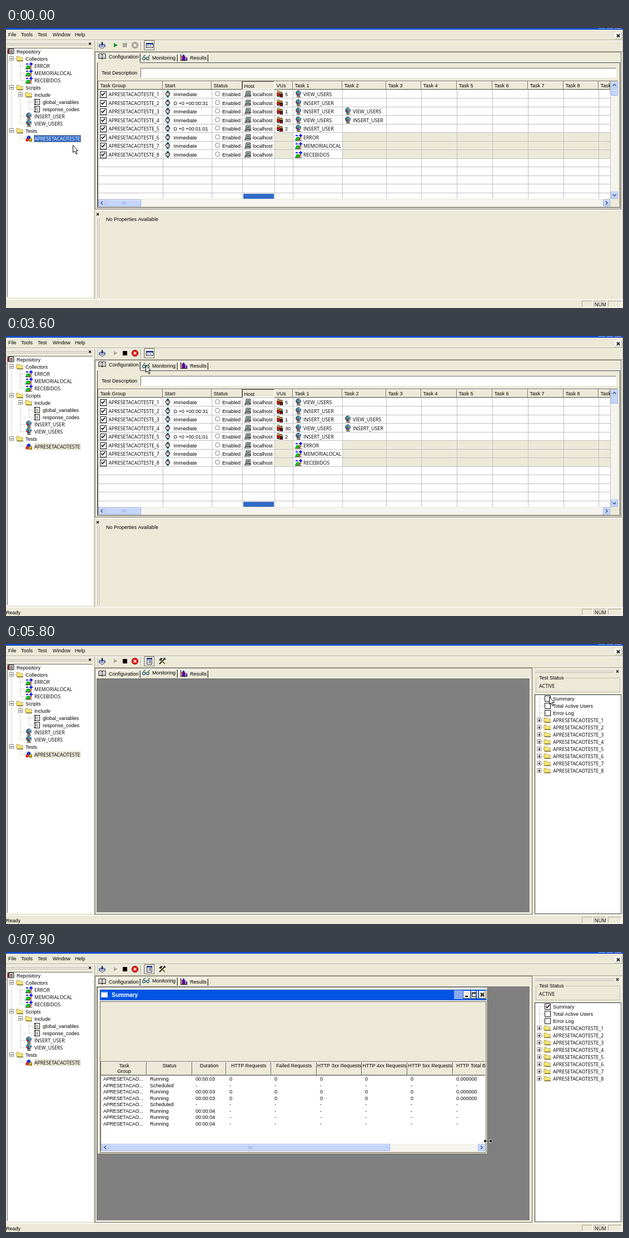
An HTML page with a canvas for the animation above (8 s loop, 1110 by 505 pixels).

```html
<!DOCTYPE html>
<html lang="en">
<head>
<meta charset="utf-8">
<title>Test runner</title>
<style>
html, body { margin: 0; width: 100%; height: 100%; overflow: hidden; background: #ece9d8; }
canvas { display: block; }
</style>
</head>
<body>
<canvas id="stage" width="1110" height="505"></canvas>
<script>
const ctx = document.getElementById('stage').getContext('2d');
const FACE = '#ece9d8', SHADE = '#aca899', DARK = '#716f64', BLUE = '#316ac5', LOOP = 8000;
const TASK = 'APRESETACAOTESTE';
const SANS = '"Liberation Sans", Arial, sans-serif';

// ---------- primitives ----------
function rect(c, x, y, w, h) { ctx.fillStyle = c; ctx.fillRect(x, y, w, h); }
function frame(c, x, y, w, h) {
  ctx.strokeStyle = c; ctx.lineWidth = 1;
  ctx.strokeRect(x + .5, y + .5, w - 1, h - 1);
}
function bevel(x, y, w, h, tl, br) {
  rect(tl, x, y, w, 1); rect(tl, x, y, 1, h);
  rect(br, x, y + h - 1, w, 1); rect(br, x + w - 1, y, 1, h);
}
function poly(pts, fill, stroke, lw = 1) {
  ctx.beginPath();
  for (let i = 0; i < pts.length; i += 2) ctx.lineTo(pts[i], pts[i + 1]);
  if (fill) { ctx.closePath(); ctx.fillStyle = fill; ctx.fill(); }
  if (stroke) { ctx.strokeStyle = stroke; ctx.lineWidth = lw; ctx.stroke(); }
}
function disc(x, y, r, fill, stroke, lw = 1) {
  ctx.beginPath(); ctx.arc(x, y, r, 0, 7);
  if (fill) { ctx.fillStyle = fill; ctx.fill(); }
  if (stroke) { ctx.strokeStyle = stroke; ctx.lineWidth = lw; ctx.stroke(); }
}
function text(s, x, y, color = '#000', align = 'left', font) {
  const caps = /[A-Z]{3}/.test(s) && !/[a-z]/.test(s);
  ctx.font = font || (caps ? '8.8px "Open Sans", "Noto Sans", sans-serif' : '9px ' + SANS);
  ctx.fillStyle = color; ctx.textAlign = align;
  ctx.fillText(s, x, y);
}
function at(x, y, draw) { ctx.save(); ctx.translate(x, y); draw(); ctx.restore(); }
function clip(x, y, w, h, draw) {
  ctx.save(); ctx.beginPath(); ctx.rect(x, y, w, h); ctx.clip(); draw(); ctx.restore();
}
function cross(x, y, r, c, lw = 1.5) {
  poly([x - r, y - r, x + r, y + r], null, c, lw);
  poly([x + r, y - r, x - r, y + r], null, c, lw);
}

// ---------- icons, centred on the origin ----------
const icons = {
  folder() {
    poly([-6, 4, -6, -4, -2, -4, -1, -2, 5, -2, 5, 4], '#f2e06a', '#a89838', .8);
    rect('#fff6b0', -5, -1, 9, 1); rect('#4d4620', -5, 4, 11, 1);
  },
  repo() {
    rect('#222', -5, -5, 10, 10); rect('#ddd', -3, -4, 7, 8);
    rect('#333', -2, -2, 5, 1); rect('#333', -2, 0, 5, 1); rect('#333', -2, 2, 5, 1);
    rect('#b02030', -6, -3, 2, 7); rect('#777', 4, -4, 2, 9);
  },
  collector() {
    poly([-6, 6, -3, 0, 2, 0, 3, 6], '#00c820', '#067a18', .7);
    poly([-5, 5.5, 6, 5.5], null, '#703030', 1);
    poly([1, 3, 5, 0, 6, 1, 2, 5], '#e02818');
    rect('#1010f0', -5, -4, 4, 2);
    rect('#1010f0', 1, -4, 6, 2); rect('#1010f0', 3, -6, 2, 6);
  },
  globe() {
    disc(0, -1.5, 4.4, '#2458d8', '#142050', .8);
    poly([-3, -4, 0, -5, 1, -2, -2, 0], '#38b838');
    poly([1, -1, 4, -2, 2, 2], '#e8c830');
    rect('#d82020', -4, -1, 3, 2); rect('#bfe0ff', 1, -5, 2, 2);
    rect('#222', -3, 3, 6, 1); rect('#c8a020', -1, 3, 3, 2); rect('#222', -3, 5, 7, 1);
  },
  file() {
    rect('#111', -5, -5, 10, 11); rect('#fff', -3, -4, 7, 9);
    rect('#8a8a40', -1, -2, 3, 1); rect('#555', -2, 0, 3, 1); rect('#555', -1, 2, 3, 1);
    rect('#aaa', -5, -3, 1, 7);
  },
  test() {
    poly([-4, -2, 0, -5, 3, -3, 3, 1, -2, 2], '#2038d8', '#101870', .6);
    disc(-3, 3, 2.7, '#e02020');
    rect('#e8d020', 0, 0, 6, 6); frame('#806c10', 0, 0, 6, 6); rect('#806c10', 1, 3, 4, 1);
  },
  watch() {
    rect('#188080', -2, -6, 4, 3); rect('#188080', -2, 3, 4, 3);
    disc(0, 0, 3.5, '#fff', '#111', 1.3);
    poly([0, -2, 0, 0, 2, 0], null, '#111', .8);
  },
  host() {
    poly([-3, -5, 5, -5, 4, 2, -4, 2], '#b8b8b8', '#222', .9);
    poly([-1, -3, 3, -3, 2, 0, -2, 0], '#507878');
    poly([-6, 5, -4, 2, 6, 2, 4, 5], '#888', '#222', .9);
    poly([-4, 4, 3, 4], null, '#eee', .8);
  },
  users() {
    rect('#d01818', -6, -2, 5, 5); disc(-3, -3.5, 2.2, '#e8c048', '#222', .8);
    rect('#111', -1, 0, 6, 6); rect('#d01818', 1, 2, 2, 4);
    disc(2, -1.5, 2.2, '#e0a030', '#111', 1); rect('#111', -5, 3, 3, 2);
  },
  book() {
    poly([-6, -4, -2, -5, 0, -3, 2, -5, 6, -4, 6, 4, 2, 3, 0, 5, -2, 3, -6, 4, -6, -4], '#fff', '#111', 1.1);
    poly([0, -3, 0, 5], null, '#111', 1.1);
    rect('#888', -4, -2, 2, 1); rect('#888', 2, -2, 2, 1); rect('#888', -4, 0, 2, 1); rect('#888', 2, 0, 2, 1);
  },
  glasses() {
    disc(-4, 2, 2.4, '#e8ffff', '#184848', 1.2); disc(3, 2, 2.4, '#e8ffff', '#184848', 1.2);
    poly([-5, 0, -3, -4, -1, -4], null, '#184848', 1);
    poly([4, 0, 6, -4, 7, -3], null, '#184848', 1); rect('#184848', -1, 1, 2, 1);
  },
  bars() {
    rect('#111', -6, -6, 1, 11); rect('#111', -6, 5, 12, 1);
    rect('#d81818', -4, -3, 2, 8); rect('#1818d8', -2, -5, 3, 10);
    rect('#901890', 1, -2, 2, 7); rect('#1818a0', 4, 0, 2, 5);
  },
  stack() {
    poly([-6, 2, 0, -1, 6, 2, 0, 6, -6, 2], '#fff', '#203070', 1);
    poly([-6, -0.5, 0, -3, 6, -0.5, 0, 3, -6, -0.5], '#dce6ff', '#203070', 1);
    rect('#203070', -1, -6, 2, 4); poly([-3, -2, 3, -2, 0, 1], '#203070');
  },
  form() {
    rect('#fff', -6, -4, 13, 9); frame('#223', -6, -4, 13, 9);
    rect('#2050c0', -5, -3, 11, 2); rect('#333', -4, 1, 3, 1); rect('#333', 0, 1, 4, 1);
  },
  doc() {
    rect('#fff', -5, -6, 10, 12); frame('#223', -5, -6, 10, 12); rect('#2050c0', -4, -5, 8, 2);
    for (let y = -2; y < 4; y += 2) { rect('#2050c0', -3, y, 1, 1); rect('#333', -1, y, 4, 1); }
  },
  tools() {
    poly([-5, 5, 4, -4], null, '#222', 2); poly([5, 5, -3, -3], null, '#807020', 2);
    poly([-6, -2, -2, -6, 1, -5, -3, -1], '#222'); poly([3, -6, 6, -3], null, '#222', 2);
  }
};
function icon(name, x, y) { at(x, y, icons[name]); }

function check(x, y, on, size = 11) {
  rect('#fff', x - 5, y - 5, size, size); frame('#111', x - 5, y - 5, size, size);
  if (on) poly([x - 2.5, y, x - .5, y + 2.5, x + 4, y - 2.5], null, '#000', 1.7);
}
function node(x, y, plus) {
  rect('#fff', x - 4, y - 4, 8, 8); frame('#8a8a80', x - 4, y - 4, 8, 8);
  rect('#000', x - 2, y, 4, 1);
  if (plus) rect('#000', x, y - 2, 1, 5);
}
function grip(x, y, w) {
  for (const d of [0, 3]) { rect('#fff', x, y + d, w, 1); rect(SHADE, x, y + d + 1, w, 1); }
}
function dots(x, y, w, h) {
  for (let i = 0; i < w + h; i += 2) rect('#b0b0a8', x + (w > h ? i : 0), y + (w > h ? 0 : i), 1, 1);
}

// ---------- scroll bars ----------
function scrollBtn(x, y, w, h, turn) {
  rect('#c6d5fb', x, y, w, h); frame('#9eb6ee', x, y, w, h); rect('#e4ecff', x + 1, y + 1, w - 2, 1);
  if (turn === undefined) return;
  at(x + w / 2, y + h / 2, () => {
    ctx.rotate(turn * Math.PI / 2);
    poly([-3, 1.5, 0, -1.5, 3, 1.5], null, '#4d6185', 1.7);
  });
}
function hScroll(x, y, right, thumbEnd) {
  rect('#f5f4ee', x, y, right - x, 13);
  scrollBtn(x, y, 13, 13, 3); scrollBtn(right - 13, y, 13, 13, 1);
  scrollBtn(x + 14, y, thumbEnd - x - 14, 13);
  const mid = Math.round((x + 14 + thumbEnd) / 2);
  for (let i = -3; i < 4; i += 2) rect('#98b0ea', mid + i, y + 4, 1, 5);
}

// ---------- window chrome ----------
function chrome() {
  rect(FACE, 0, 0, 1110, 505);
  rect('#0a50d8', 0, 0, 1110, 2); rect('#0842b8', 0, 2, 1110, 1);
  rect('#a8c0f8', 1066, 0, 12, 1); rect('#a8c0f8', 1080, 0, 12, 1); rect('#e8b0a0', 1095, 0, 12, 1);
  text('File', 4, 15); text('Tools', 27, 15); text('Test', 57, 15);
  text('Window', 84, 15); text('Help', 124, 15);
  rect('#f8f7f0', 1095, 8, 13, 12); bevel(1095, 8, 13, 12, '#fff', SHADE);
  cross(1101.5, 14, 2.7, '#000', 1.7);
  rect(SHADE, 0, 21, 1110, 1); rect('#fff', 0, 22, 1110, 1);
  rect('#fff', 1108, 22, 1, 468); rect(SHADE, 1109, 3, 1, 502);
}
function statusBar(t) {
  rect('#fff', 0, 489, 1110, 1); rect(FACE, 0, 490, 1110, 15);
  if (t >= 1300) text('Ready', 0, 502);
  for (const [x, w] of [[1036, 20], [1057, 23], [1083, 25]]) bevel(x, 492, w, 12, SHADE, '#fff');
  text('NUM', 1059, 502);
}

const repository = [
  [0, 'repo', 'Repository'], [1, 'folder', 'Collectors'],
  [2, 'collector', 'ERROR'], [2, 'collector', 'MEMORIALOCAL'], [2, 'collector', 'RECEBIDOS'],
  [1, 'folder', 'Scripts'], [2, 'folder', 'Include'],
  [3, 'file', 'global_variables'], [3, 'file', 'response_codes'],
  [2, 'globe', 'INSERT_USER'], [2, 'globe', 'VIEW_USERS'],
  [1, 'folder', 'Tests'], [2, 'test', TASK]
];
function tree(t) {
  grip(2, 26, 145); cross(151, 28.5, 2, '#000', 1.3);
  rect('#fff', 2, 36, 155, 450); bevel(2, 36, 155, 450, DARK, '#fff');
  rect(SHADE, 159, 23, 1, 466);
  dots(10, 48, 1, 137); dots(25, 61, 1, 33); dots(25, 113, 1, 59); dots(25, 191, 1, 7); dots(41, 126, 1, 20);
  repository.forEach(([depth, pic, label], i) => {
    const x = 9 + depth * 16 - (depth === 3 ? 1 : 0), y = 42 + i * 13 + (i > 11 ? 1 : 0);
    if (depth) dots(x - 15, y, 10, 1);
    if (pic === 'folder') node(x - 15, y);
    icon(pic, x, y);
    const chosen = label === TASK, focus = chosen && t < 1700;
    if (chosen) rect(focus ? BLUE : FACE, 50, y - 6, 85, 13);
    if (focus) { ctx.setLineDash([1, 1]); frame('#e0b060', 50, y - 6, 85, 13); ctx.setLineDash([]); }
    text(label, x + 10, y + 4, focus ? '#fff' : '#000');
  });
}

function toolbar(t, monitor) {
  rect('#fff', 163, 24, 1, 16); rect(SHADE, 164, 24, 1, 16);
  icon('stack', 173, 31);
  const started = t >= 1900, live = t >= 2600;
  if (t >= 1300 && !started) {
    const down = t >= 1700;
    bevel(188, 23, 18, 18, down ? SHADE : '#fff', down ? '#fff' : SHADE);
  }
  if (started) poly([195, 28, 202, 32, 195, 36], '#fff');
  poly([194, 27, 201, 31, 194, 35], started ? SHADE : '#0a9a20');
  if (!live) rect('#fff', 211, 28, 8, 8);
  rect(live ? '#000' : SHADE, 210, 27, 8, 8);
  disc(232, 31, 5.8, live ? '#e01818' : '#aca899', live ? '#801010' : '#999585', .8);
  cross(232, 31, 2.3, '#fff', 1.6);
  rect(SHADE, 242, 23, 1, 18); rect('#fff', 243, 23, 1, 18);
  rect('#fff', 246, 24, 1, 16); rect(SHADE, 247, 24, 1, 16);
  rect('#f6f4ec', 249, 22, 18, 18); frame(DARK, 249, 22, 18, 18);
  icon(monitor ? 'doc' : 'form', 258, 31);
  if (monitor) icon('tools', 281, 31);
  rect(SHADE, 160, 42, 950, 1);
}

function tabs(active, right, bottom) {
  frame(DARK, 160, 43, right - 160, bottom - 43);
  rect('#fff', 161, 44, 1, bottom - 45);
  rect('#fff', 163, 61, right - 166, 1);
  [[164, 242, 'book', 'Configuration', 173, 185], [243, 309, 'glasses', 'Monitoring', 252, 263],
   [310, 364, 'bars', 'Results', 320, 331]].forEach(([a, b, pic, label, ix, tx], i) => {
    const on = i === active, up = on ? 0 : 2;
    rect(FACE, a, 45 + up, b - a, on ? 18 : 14);
    rect('#fff', a, 45 + up, b - a, 1); rect('#fff', a, 45 + up, 1, 16 - up);
    rect('#444', b - 1, 46 + up, 1, 15 - up); rect(SHADE, b - 2, 46 + up, 1, 15 - up);
    icon(pic, ix, 51 + up); text(label, tx, 55 + up);
  });
}

// ---------- configuration page ----------
const cols = [166, 282, 370, 425, 483, 516, 605, 684, 747, 811, 875, 939, 1003, 1066, 1087];
const heads = ['Task Group', 'Start', 'Status', 'Host', 'VUs'];
for (let i = 1; i < 10; i++) heads.push('Task ' + i);
const V = 'VIEW_USERS', I = 'INSERT_USER', NOW = 'Immediate';
const plan = [
  [NOW, 5, V], ['D +0 +00:00:31', 3, I], [NOW, 1, I, V], [NOW, 30, V, I], ['D +0 +00:01:01', 2, I],
  [NOW, 0, 'ERROR'], [NOW, 0, 'MEMORIALOCAL'], [NOW, 0, 'RECEBIDOS']
];
function configPage() {
  tabs(0, 1107, 327);
  frame('#444', 164, 62, 941, 262);
  rect(FACE, 165, 62, 76, 1);
  text('Test Description', 172, 84);
  rect('#fff', 242, 72, 856, 18); bevel(242, 72, 856, 18, DARK, '#fff');

  rect(DARK, 165, 95, 936, 1); rect(DARK, 165, 95, 1, 227);
  rect('#fff', 166, 96, 922, 212);
  rect(FACE, 166, 96, 922, 15);
  rect(FACE, 484, 189, 32, 46); rect(FACE, 606, 189, 481, 46);
  for (let i = 0; i < 13; i++) rect('#c0c0c0', 166, Math.floor(111 + i * 15.5), 921, 1);
  cols.slice(1).forEach(x => rect('#c0c0c0', x, 111, 1, 197));
  rect('#555', 166, 110, 921, 1);
  heads.forEach((h, i) => {
    const x = cols[i], w = cols[i + 1] - x, press = h === 'Host';
    bevel(x, 96, w, 15, press ? '#555' : '#fff', press ? '#fff' : DARK);
    clip(x, 96, w, 15, () => text(h, x + 3.5, press ? 108 : 107));
  });
  plan.forEach(([start, users, ...tasks], i) => {
    const y = Math.round(119 + i * 15.5), base = y + 3.5;
    check(174, y, true, 12); text(TASK + '_' + (i + 1), 184.5, base);
    icon('watch', 291, y); text(start, 301.5, base);
    disc(380.5, y - .5, 4, '#fff', '#777', 1); text('Enabled', 389, base);
    icon('host', 435, y); text('localhost', 444, base);
    if (users) { icon('users', 493, y); text(String(users), 502, base); }
    tasks.forEach((s, k) => {
      icon(users ? 'globe' : 'collector', 526 + k * 89, y);
      text(s, 535 + k * 89, base);
    });
  });
  rect(BLUE, 427, 299, 55, 9);
  rect('#f5f4ee', 1088, 96, 13, 212);
  scrollBtn(1088, 97, 13, 12, 0); scrollBtn(1088, 110, 13, 12); scrollBtn(1088, 295, 13, 13, 2);
  hScroll(166, 309, 1087, 243);
  rect(FACE, 1087, 309, 14, 13);

  rect('#fff', 161, 328, 947, 1);
  cross(165, 336, 2, '#000', 1.3);
  for (const x of [163, 166]) { rect('#fff', x, 343, 1, 143); rect(SHADE, x + 1, 343, 1, 143); }
  text('No Properties Available', 180, 348);
}

// ---------- monitoring page ----------
function monitorPage(t) {
  tabs(1, 947, 488);
  rect('#808080', 164, 62, 778, 422);
  bevel(163, 62, 780, 423, DARK, '#fff');

  grip(952, 47, 141); cross(1100, 49.5, 2, '#000', 1.3);
  frame('#c4c0b0', 953, 61, 152, 26);
  rect(FACE, 957, 58, 48, 8); text('Test Status', 959, 64); text('ACTIVE', 959, 79);
  rect('#fff', 951, 91, 156, 396); bevel(951, 91, 156, 396, '#333', '#555');
  const shown = t >= 6100;
  dots(959, 98, 1, 126);
  ['Summary', 'Total Active Users', 'Error Log'].forEach((s, i) => {
    const y = 98 + i * 13, lit = !i && shown && t < 7900;
    dots(960, y, 8, 1); check(974, y, !i && shown);
    if (lit) rect(BLUE, 983, 92, 39, 13);
    text(s, 984, y + 3.5, lit ? '#fff' : '#000');
  });
  for (let i = 0; i < 8; i++) {
    const y = 137 + i * 13;
    dots(963, y, 5, 1); node(959, y, true); icon('folder', 974, y);
    text(TASK + '_' + (i + 1), 984, y + 4);
  }
  if (shown) summary(t);
}

function header(y, edges, labels, right) {
  rect(FACE, 171, y, right - 171, 25);
  rect('#fff', 171, y, right - 171, 1); rect(DARK, 171, y + 24, right - 171, 1); rect(SHADE, 171, y + 23, right - 171, 1);
  edges.forEach((x, i) => {
    if (i) { rect('#555', x - 1, y + 1, 1, 23); rect('#fff', x, y + 1, 1, 23); }
    const lines = (labels[i] || '').split('/'), last = i === edges.length - 1;
    const mid = last ? x + 6 : (x + edges[i + 1]) / 2;
    lines.forEach((s, k) => text(s, mid, y + 9.5 + k * 10.5, '#000', last ? 'left' : 'center', '8.9px ' + SANS));
  });
}

// The frame turns plain and the title buttons square while the window is resized.
function summaryFrame(right, resizing) {
  if (resizing) {
    rect(FACE, 165, 64, right - 165, 301);
    bevel(165, 64, right - 165, 301, FACE, DARK);
    bevel(166, 65, right - 167, 299, '#fff', SHADE);
    rect('#0054e3', 169, 68, right - 172, 19);
  } else {
    rect('#000', 165, 64, 5, 4); rect('#000', right - 5, 64, 5, 4);
    rect('#4a6ae0', 165, 66, right - 165, 299); rect('#8ca4f0', 167, 88, 1, 275);
    rect('#2848c8', 165, 364, right - 165, 1);
    const g = ctx.createLinearGradient(0, 66, 0, 89);
    g.addColorStop(0, '#2a78f4'); g.addColorStop(.2, '#0052e2');
    g.addColorStop(.8, '#0058ee'); g.addColorStop(1, '#0040c0');
    rect(g, 166, 66, right - 167, 22);
    rect('#0a3cb0', 186, 68, 2, 18); text(':', 186, 80, '#fff');
  }
  rect('#fff', 171, 72, 12, 10); rect('#7ea6f0', 171, 72, 12, 2); frame('#c8dcff', 171, 72, 12, 10);
  text('Summary', 190, 80.5, '#fff', 'left', 'bold 10.4px ' + SANS);
  if (resizing) {
    rect('#8aa8f0', 806, 69, 16, 16);
    for (const x of [823, 837, 851]) { rect(FACE, x, 70, 13, 14); bevel(x, 70, 13, 14, '#fff', DARK); }
    rect('#000', 826, 79, 5, 2);
    frame('#000', 838, 73, 8, 8); rect('#000', 838, 73, 8, 2); rect('#2050d0', 845, 69, 2, 15);
    cross(857, 77, 3, '#000', 1.8);
  } else {
    [793, 813, 832].forEach((x, i) => {
      rect(i < 2 ? '#3a6cec' : '#c46070', x, 69, 16, 16); frame('#dce6ff', x, 69, 16, 16);
    });
    rect('#fff', 796, 79, 6, 2); frame('#fff', 817, 73, 8, 8); rect('#fff', 817, 73, 8, 2);
    cross(840, 77, 3, '#fff', 1.8);
  }
}

function summary(t) {
  const resizing = t >= 7900, right = resizing ? 867 : 852, inner = right - 4;
  summaryFrame(right, resizing);
  rect(FACE, 169, 89, right - 172, 273); frame(DARK, 169, 89, right - 172, 273);

  clip(170, 90, inner - 170, 271, () => {
    if (!resizing) {
      const edges = [172, 253, 335, 416, 497, 579, 661, 742, 824];
      text('Test Summary', 174, 102, '#000', 'left', '8.6px ' + SANS);
      rect('#fff', 171, 110, inner - 172, 66);
      header(110, edges, ['HTTP Total Bytes/per Second', 'Started/VUs', 'Active/VUs', 'Inactive/VUs',
        'HTTP 4xx Requests/per Second', 'HTTP 5xx Requests/per Second', 'Task Iterations/per Second',
        'Average Request/Latency'], inner);
      edges.slice(0, 8).forEach(x => text('-', x + 6, 145));
      bevel(170, 109, inner - 170, 68, DARK, '#fff');
      text('Task Group Summary', 174, 190, '#000', 'left', '8.7px ' + SANS);
    }
    rect('#fff', 171, 198, inner - 172, 148);
    const edges = [172, 253, 335, 396, 477, 559, 640, 722, 804];
    header(198, edges, ['Task/Group', 'Status', 'Duration', 'HTTP Requests', 'Failed Requests',
      'HTTP 3xx Requests', 'HTTP 4xx Requests', 'HTTP 5xx Requests', 'HTTP Total Bytes'], inner);
    const filled = t >= 7000;
    for (let i = 0; i < 8; i++) {
      const y = Math.round(232 + i * 11.5), waits = i === 1 || i === 4, load = filled && !waits && i < 5;
      text('APRESETACAO...', 175, y, '#000', 'left', '8.7px ' + SANS);
      text(!filled ? '-' : waits ? 'Scheduled' : 'Running', 259, y);
      text(!filled || waits ? '-' : i < 5 ? '00:00:03' : '00:00:04', 341, y);
      edges.slice(3).forEach((x, k) => text(!load ? '-' : k < 5 ? '0' : '0.000000', x + 6, y));
    }
    bevel(170, 197, inner - 170, 163, DARK, '#fff');
  });
  hScroll(172, 346, inner - 1, resizing ? 691 : 667);
}

// ---------- pointer ----------
// start, end, x, y: one step every 100 ms
const moves = [
  [1300, 1300, 191, 37], [2900, 3600, 251, 52], [4500, 4500, 270, 51], [4700, 4700, 325, 55],
  [4900, 5100, 946, 105], [5300, 5800, 977, 95], [6300, 6300, 878, 105], [6500, 6600, 720, 399],
  [6700, 6800, 810, 354], [7000, 7000, 835, 349], [7100, 7100, 847, 338],
  [7300, 7300, 851, 342], [7700, 7700, 851, 341], [7900, 7900, 867, 341]
];
function pointer(t) {
  let x = 120, y = 211;
  for (const [a, b, tx, ty] of moves) {
    if (t < a) break;
    const p = Math.min(1, (Math.floor((t - a) / 100) + 1) / ((b - a) / 100 + 1));
    x += (tx - x) * p; y += (ty - y) * p;
  }
  at(Math.round(x), Math.round(y), () => {
    if (t >= 7300) {
      poly([-8, 0, -4, -4, -4, -1, 4, -1, 4, -4, 8, 0, 4, 4, 4, 1, -4, 1, -4, 4], '#000', '#fff', .7);
    } else {
      poly([.5, .5, .5, 13.5, 3.5, 11, 6, 16.5, 8, 15.5, 5.8, 10.3, 9.5, 10.3, .5, .5], '#fff', '#000', 1);
    }
  });
}

function draw(now) {
  const t = now % LOOP, monitor = t >= 4500;
  chrome();
  tree(t);
  toolbar(t, monitor);
  if (monitor) monitorPage(t); else configPage();
  statusBar(t);
  pointer(t);
  requestAnimationFrame(draw);
}
requestAnimationFrame(draw);
</script>
</body>
</html>
```
